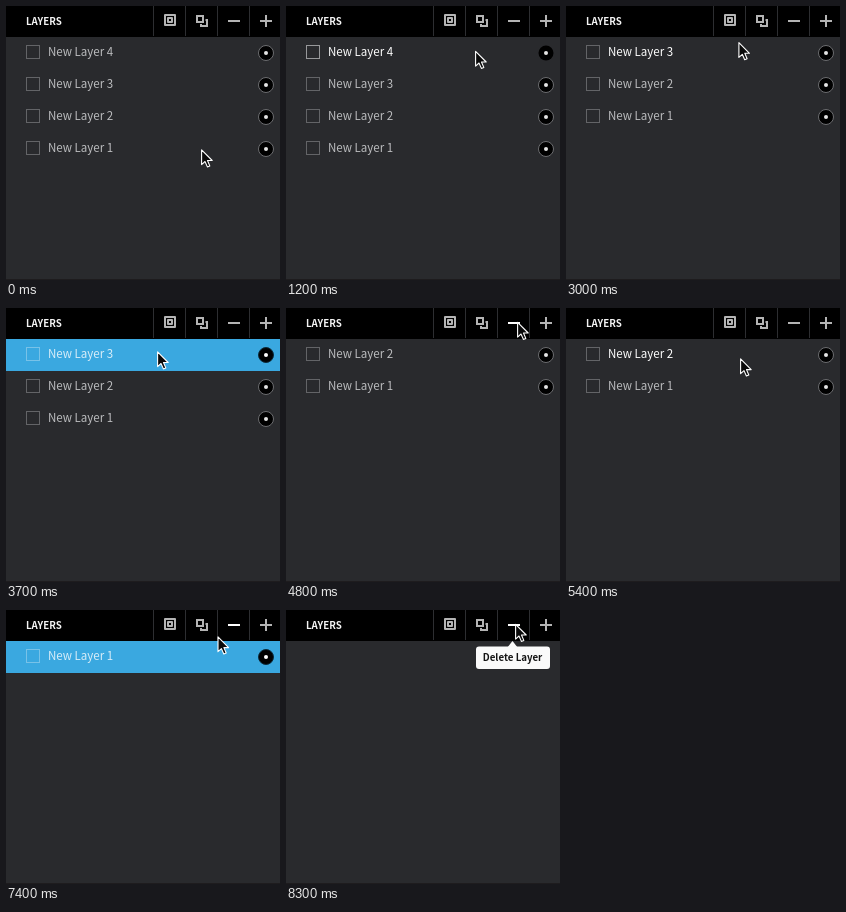
An HTML page that plays this animation: 274 px wide and 274 px high, repeating every 8.5 s.

```html
<!DOCTYPE html>
<html lang="en">
<head>
<meta charset="utf-8">
<title>Layers panel</title>
<style>
  html, body { margin: 0; width: 100%; height: 100%; overflow: hidden; background: #292a2d; }
  svg { display: block; width: 274px; height: 274px; }
  text { font-family: "Noto Sans CJK JP", "Noto Sans CJK SC", "Noto Sans CJK", "Noto Sans", sans-serif; }
  .title { font-size: 9.75px; font-weight: 700; fill: #f4f4f4; }
  .tip text { font-size: 9.7px; font-weight: 700; fill: #141414; }
  .icon { fill: none; stroke: #b4b4b4; stroke-width: 2; }
  .icon.hover { stroke: #fff; }
  .row text { font-size: 11.55px; fill: #bcbdbf; }
  .row .band { fill: none; }
  .row .box { fill: none; stroke: #636467; }
  .row .eye { fill: #000; stroke: #6c6d70; }
  .row .dot { fill: #e4e4e4; }
  .row.hover text { fill: #fff; }
  .row.pressed .box { stroke: #97989a; }
  .row.pressed .eye { stroke: none; }
  .row.selected .band { fill: #3aa8e0; }
  .row.selected .box { stroke: #78c2e8; }
  .row.selected .eye { stroke: #0d2a3a; }
  .row.selected text { fill: #d8edf8; }
  .row.selected .dot { fill: #fff; }
</style>
</head>
<body>
<svg viewBox="0 0 274 274">
  <rect width="274" height="274" fill="#292a2d"/>
  <rect y="273" width="274" height="1" fill="#1e1c1e"/>
  <g id="rows"></g>
  <rect width="274" height="31" fill="#000"/>
  <path d="M147.5 0V30M179.5 0V30M211.5 0V30M243.5 0V30" stroke="#2d2e31"/>
  <text class="title" x="19.9" y="18.8">LAYERS</text>
  <path class="icon" d="M159 9H169V19H159ZM162 12H166V16H162Z" stroke-linejoin="round"/>
  <path class="icon" d="M191 10H197V16H191ZM199.5 14H201V20H195V18"/>
  <path class="icon" d="M222 15H234"/>
  <path class="icon" d="M254 15H266M260 9V21"/>
  <g class="tip" id="tip">
    <path d="M221 38L226.5 31L232 38Z" fill="#fafafa"/>
    <rect x="190" y="36.5" width="74" height="22.5" rx="3" fill="#fafafa"/>
    <text x="196.8" y="51.3">Delete Layer</text>
  </g>
  <path id="cursor" d="M.6 .8V15.6L4 12.5L6.4 17.9L8.8 16.9L6.5 11.5H11.2Z"
        fill="#0a0a0a" stroke="#fff" stroke-width="1.1" stroke-linejoin="round"/>
</svg>
<script>
const LOOP = 8500, STEP = 100, ROW = 32, TOP = 31;

// Each round: select the top layer at `row`, then delete it with the minus button
const rounds = [
  { select: 1300, remove: 2400, row: [189, 44.5], button: [236, 14] },
  { select: 3500, remove: 4800, row: [151, 43], button: [231, 13.5] },
  { select: 5700, remove: 6500, row: [171, 52], button: [230, 13.5] },
  { select: 7200, remove: 7900, row: [178, 50], button: [229, 13.5] }
];
const home = { remove: 0, button: [195, 143] };

const $ = id => document.getElementById(id);
const icons = document.querySelectorAll(".icon");

$("rows").innerHTML = rounds.map((_, i) => `
  <g class="row" transform="translate(0 ${TOP + i * ROW})">
    <rect class="band" width="274" height="32"/>
    <rect class="box" x="20.5" y="8.5" width="13" height="13"/>
    <text x="41.9" y="19.2"></text>
    <circle class="eye" cx="260" cy="16" r="7.5"/>
    <circle class="dot" cx="260" cy="16" r="2"/>
  </g>`).join("");
const rows = document.querySelectorAll(".row");

const progress = (t, from, to) => Math.min(1, Math.max(0, (t - from) / (to - from)));
const ease = p => (1 - Math.cos(Math.PI * p)) / 2;
const mix = (a, b, p) => a.map((v, i) => v + (b[i] - v) * p);

// The pointer reaches the row shortly before selecting and the button shortly before deleting
function pointerAt(t, done) {
  const last = done ? rounds[done - 1] : home;
  const round = rounds[done];
  if (!round) return last.button;
  const onRow = mix(last.button, round.row, ease(progress(t, last.remove, round.select - 200)));
  return mix(onRow, round.button, ease(progress(t, round.remove - 800, round.remove - 300)));
}

function render(t) {
  const done = rounds.filter(round => t >= round.remove).length;
  const count = rounds.length - done;
  const [x, y] = pointerAt(t, done);
  const sinceSelect = count ? t - rounds[done].select : -Infinity;
  const hoverRow = t > 0 && y >= TOP ? Math.floor((y - TOP) / ROW) : -1;
  const hoverIcon = y < TOP ? Math.floor((x - 147) / ROW) : -1;

  rows.forEach((row, i) => {
    row.style.display = i < count ? "" : "none";
    row.querySelector("text").textContent = `New Layer ${count - i}`;
    row.classList.toggle("hover", i === hoverRow);
    row.classList.toggle("pressed", i === 0 && sinceSelect >= -STEP);
    row.classList.toggle("selected", i === 0 && sinceSelect >= 0);
  });
  icons.forEach((icon, i) => icon.classList.toggle("hover", i === hoverIcon));
  $("tip").setAttribute("opacity", progress(t, rounds[3].remove, rounds[3].remove + 400));
  $("cursor").setAttribute("transform", `translate(${x.toFixed(1)} ${y.toFixed(1)})`);
}

const start = performance.now();
function tick() {
  const t = (performance.now() - start) % LOOP;
  render(Math.floor(t / STEP) * STEP);
  requestAnimationFrame(tick);
}
tick();
</script>
</body>
</html>
```
